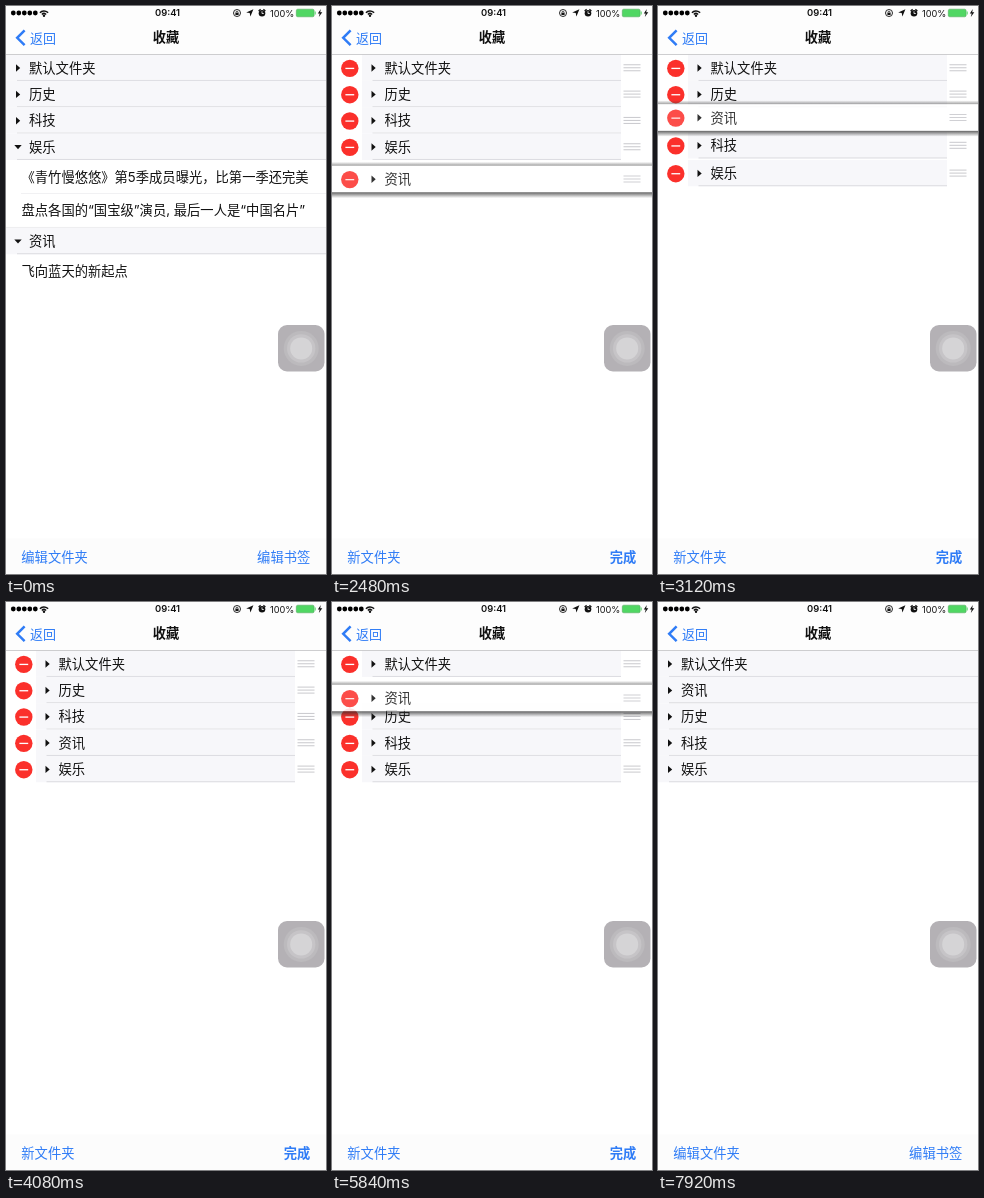
Write an HTML page with a canvas that moves like this. It is 320 px wide and 568 px high and loops after 8 s.

```html
<!DOCTYPE html>
<html lang="zh-CN">
<head>
<meta charset="utf-8">
<title>收藏</title>
<style>
html, body { margin: 0; width: 100%; height: 100%; overflow: hidden; background: #fff; }
canvas { display: block; width: 320px; height: 568px; }
</style>
</head>
<body>
<canvas id="stage"></canvas>
<script>
const W = 320, H = 568, LOOP = 8000, STEP = 80;
const TOP = 48.6, ROW = 26.33, SUB = 34;
const BLUE = '#2f7cf6', INK = '#111', GREY = '#f7f7fa', LINE = '#dcdce0';
const FONT = 'Inter, "Noto Sans CJK SC", "Noto Sans CJK", sans-serif';

const canvas = document.getElementById('stage');
const ctx = canvas.getContext('2d');
const dpr = window.devicePixelRatio || 1;
canvas.width = W * dpr;
canvas.height = H * dpr;

const slotY = slot => TOP + ROW * (slot + 0.5);
const mix = (a, b, p) => a + (b - a) * p;

// Eased value of a [time, value] track
function track(t, keys) {
  if (t <= keys[0][0]) return keys[0][1];
  for (let i = 1; i < keys.length; i++) {
    const [t0, a] = keys[i - 1], [t1, b] = keys[i];
    if (t < t1) {
      const p = (t - t0) / (t1 - t0);
      return mix(a, b, p * p * (3 - 2 * p));
    }
  }
  return keys[keys.length - 1][1];
}

const editTrack = [[120, 0], [520, 1], [7160, 1], [7560, 0]];
const expandTrack = [[120, 1], [520, 0]];
const liftTrack = [[1620, 0], [1900, 1], [3800, 1], [4060, 0], [4900, 0], [5100, 1], [6220, 1], [6460, 0]];
const dragTrack = [
  [1840, slotY(4)], [2080, 171], [2200, 171], [2320, 172.5], [2480, 173], [3120, 111.5],
  [3280, 108], [3400, 109], [3840, slotY(3)], [4920, slotY(3)], [5120, 134],
  [5720, 95], [5840, 96], [6280, slotY(1)]
];
const rows = [
  { name: '默认文件夹', slots: [[0, 0]] },
  { name: '历史', slots: [[5500, 1], [5760, 2]] },
  { name: '科技', slots: [[2880, 2], [3160, 3], [3500, 3], [3760, 2], [5260, 2], [5520, 3]] },
  { name: '娱乐', slots: [[2660, 3], [2900, 4]], open: true }
];

function rect(x, y, w, h, color) {
  ctx.fillStyle = color;
  ctx.fillRect(x, y, w, h);
}

function disc(x, y, r, color) {
  ctx.fillStyle = color;
  ctx.beginPath();
  ctx.arc(x, y, r, 0, Math.PI * 2);
  ctx.fill();
}

function poly(points, color) {
  ctx.fillStyle = color;
  ctx.beginPath();
  points.forEach(([x, y]) => ctx.lineTo(x, y));
  ctx.fill();
}

function stroke(points, color, width) {
  ctx.strokeStyle = color;
  ctx.lineWidth = width;
  ctx.beginPath();
  points.forEach(([x, y]) => ctx.lineTo(x, y));
  ctx.stroke();
}

function ring(x, y, r, width, from = 0, to = Math.PI * 2) {
  ctx.strokeStyle = INK;
  ctx.lineWidth = width;
  ctx.beginPath();
  ctx.arc(x, y, r, from, to);
  ctx.stroke();
}

function text(str, x, y, { color = INK, size = 13.3, weight = 400, align = 'left' } = {}) {
  ctx.font = `${weight} ${size}px ${FONT}`;
  ctx.fillStyle = color;
  ctx.textAlign = align;
  ctx.fillText(str, x, y + size * 0.365);
}

function faded(alpha, draw) {
  if (alpha <= 0) return;
  ctx.save();
  ctx.globalAlpha *= alpha;
  draw();
  ctx.restore();
}

function arrow(x, y, turn) {
  ctx.save();
  ctx.translate(x, y);
  ctx.rotate(turn * Math.PI / 2);
  poly([[-2, -3.7], [2.2, 0], [-2, 3.7]], INK);
  ctx.restore();
}

function rowContent(name, y, edit, open) {
  const shift = 29.5 * edit;
  arrow(12 + shift, y + 0.3, open);
  text(name, 23 + shift, y + 0.2);
  faded(edit, () => {
    disc(17.8, y + 0.6, 8.7, '#fb302b');
    rect(13.4, y, 8.8, 1.3, '#fff');
    for (let i = -1; i <= 1; i++) rect(291.5, y - 0.5 + i * 3, 17, 1, '#c9c9cd');
  });
}

function row(name, y, edit, open = 0) {
  const left = 30 * edit, right = W - 31 * edit;
  rect(left, y - ROW / 2, right - left, ROW, GREY);
  rect(11 + 29.5 * edit, y + ROW / 2 - 1, right - 11 - 29.5 * edit, 1, LINE);
  rowContent(name, y, edit, open);
}

function shadow(from, to, color) {
  const g = ctx.createLinearGradient(0, from, 0, to);
  g.addColorStop(0, color);
  g.addColorStop(1, 'rgba(60,60,60,0)');
  rect(0, Math.min(from, to), W, Math.abs(to - from), g);
}

function liftedRow(name, y) {
  const top = y - ROW / 2, bottom = y + ROW / 2;
  shadow(top, top - 4, 'rgba(60,60,60,.5)');
  shadow(bottom, bottom + 6, 'rgba(40,40,40,.75)');
  faded(0.86, () => {
    rect(0, top, W, ROW, '#fff');
    rowContent(name, y, 1, 0);
  });
}

function articles(alpha) {
  const start = slotY(3) + ROW / 2;
  faded(alpha, () => {
    text('《青竹慢悠悠》第5季成员曝光，比第一季还完美', 15.5, start + 17);
    rect(15, start + SUB - 0.7, W - 15, 0.7, '#ececee');
    text('盘点各国的“国宝级”演员, 最后一人是“中国名片”', 15.5, start + SUB + 16.5);
    rect(0, start + 2 * SUB - 1, W, 1, '#ececee');
    text('飞向蓝天的新起点', 15.5, start + 2 * SUB + ROW + 17.2);
  });
}

function list(t) {
  const edit = track(t, editTrack), expand = track(t, expandTrack), lift = track(t, liftTrack);
  articles(expand);
  rows.forEach(r => row(r.name, slotY(track(t, r.slots)), edit, r.open ? expand : 0));
  const y = track(t, dragTrack) + 2 * SUB * expand;
  faded(1 - lift, () => row('资讯', y, edit, expand));
  faded(lift, () => liftedRow('资讯', y));
}

function statusBar() {
  for (let i = 0; i < 5; i++) disc(7.3 + i * 5.5, 7, 2.4, '#000');
  for (const r of [2.8, 5.4]) ring(38, 10.3, r, 1.5, -Math.PI * 0.77, -Math.PI * 0.23);
  disc(38, 9.8, 1.2, INK);
  text('09:41', 161.5, 7, { size: 9.4, weight: 600, align: 'center' });

  ring(231, 7, 3.5, 0.9);
  rect(229.4, 6.6, 3.2, 2.4, INK);
  ring(231, 6.4, 1.1, 0.7, Math.PI, 0);
  poly([[247.4, 3.3], [244.4, 10.6], [243.7, 7.1], [240.2, 6.5]], INK);
  disc(256, 7.3, 3.3, INK);
  stroke([[252.6, 5], [254.6, 3.2]], INK, 1.2);
  stroke([[257.4, 3.2], [259.4, 5]], INK, 1.2);
  stroke([[256, 5.3], [256, 7.5], [257.8, 7.5]], '#fff', 0.8);

  text('100%', 288.3, 7.2, { size: 9.2, align: 'right' });
  ctx.strokeStyle = '#56a862';
  ctx.lineWidth = 0.6;
  ctx.beginPath();
  ctx.roundRect(290.3, 3.2, 17.8, 7.6, 1.5);
  ctx.fillStyle = '#50d763';
  ctx.fill();
  ctx.stroke();
  rect(308.7, 5.5, 1, 3, '#50d763');
  poly([[314.8, 3], [311.8, 7.6], [313.7, 7.6], [312.8, 11], [316.3, 6.3], [314.2, 6.3]], INK);
}

function navBar() {
  rect(0, 0, W, 48, '#fdfdfd');
  rect(0, 48, W, 0.8, '#c2c2c5');
  statusBar();
  stroke([[18.6, 24.4], [11.2, 31.8], [18.6, 39.2]], BLUE, 2.5);
  text('返回', 24, 31.8, { color: BLUE, size: 13 });
  text('收藏', 160, 31.6, { size: 13.2, weight: 700, align: 'center' });
}

function toolBar(editing) {
  const left = editing ? '新文件夹' : '编辑文件夹';
  const right = editing ? '完成' : '编辑书签';
  rect(0, 532.5, W, H - 532.5, '#fcfcfc');
  text(left, 15.3, 551.2, { color: BLUE });
  text(right, 304.3, 551.2, { color: BLUE, weight: editing ? 700 : 400, align: 'right' });
}

function floatingButton() {
  ctx.fillStyle = '#b4b1b5';
  ctx.beginPath();
  ctx.roundRect(272, 319, 46.5, 46.5, 9);
  ctx.fill();
  disc(295.2, 342.4, 17.5, '#bcbabd');
  disc(295.2, 342.4, 14.2, '#c6c4c7');
  disc(295.2, 342.4, 11, '#d5d4d6');
}

function render(now) {
  const t = Math.floor((now % LOOP) / STEP) * STEP;
  ctx.setTransform(dpr, 0, 0, dpr, 0, 0);
  rect(0, 0, W, H, '#fff');
  list(t);
  navBar();
  toolBar(t >= 160 && t < 7200);
  floatingButton();
}

const startTime = performance.now();
function loop() {
  render(performance.now() - startTime);
  requestAnimationFrame(loop);
}
loop();
</script>
</body>
</html>
```
